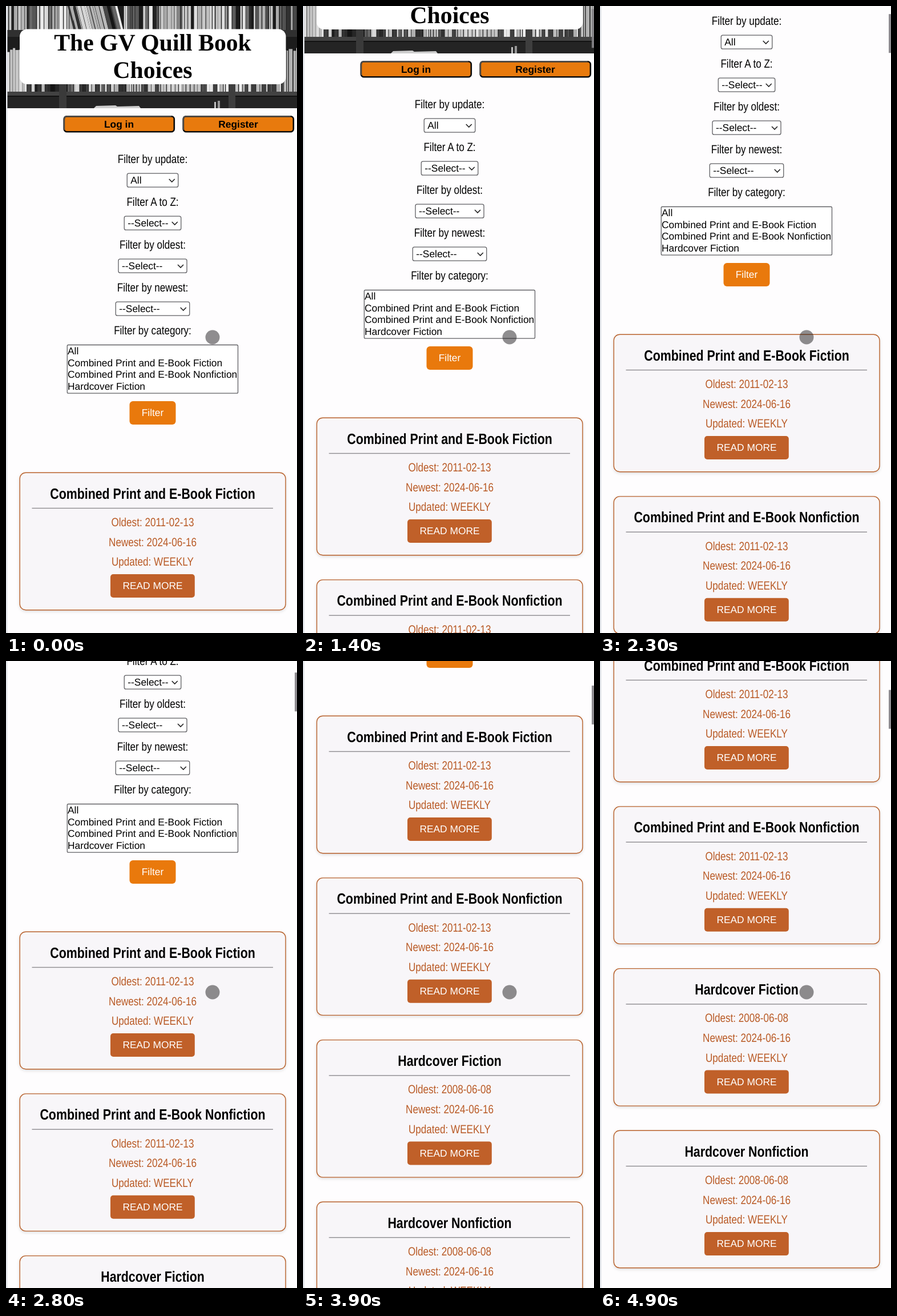
Animation, 510 px wide and 1098 px high, one loop 5000 ms. Source, as an HTML page:

```html
<!DOCTYPE html>
<html lang="en">
<head>
<meta charset="utf-8">
<title>Book lists</title>
<style>
  html, body { margin: 0; width: 100%; height: 100%; overflow: hidden; background: #fefdfe; }
  svg { display: block; text-rendering: geometricPrecision; font-family: "Liberation Sans", Arial, sans-serif; }
  .title { font-family: "Liberation Serif", Times, serif; font-weight: bold; font-size: 41.7px; }
  .ui { font-size: 17.37px; }
  .label { font-size: 20.84px; }
  .head { font-size: 26.05px; font-weight: bold; }
  .bold { font-weight: bold; }
  .mid { text-anchor: middle; }
  .box { fill: #fff; stroke: #5f5f63; stroke-width: 1.3; }
  .card { fill: #f8f6f9; stroke: #b9622c; stroke-width: 1.4; filter: drop-shadow(0 2px 2.5px rgba(0,0,0,.13)); }
</style>
</head>
<body>
<svg width="510" height="1098" viewBox="0 0 510 1098">
  <defs><clipPath id="banner"><rect x="2" width="508" height="179"/></clipPath></defs>
  <g id="page"></g>
  <rect width="2.5" height="1098" fill="#e3e6eb"/>
  <rect id="thumb" x="506" width="4" height="68" fill="#858387" opacity=".92"/>
  <circle cx="362" cy="580" r="12.5" fill="#201e20" opacity=".5"/>
</svg>
<script>
const MID = 257, NARROW = 0.82;

const rect = (x, y, w, h, attrs) => `<rect x="${x}" y="${y}" width="${w}" height="${h}" ${attrs}/>`;
const text = (x, y, str, cls, fill = '#000') => `<text x="${x}" y="${y}" class="${cls}" fill="${fill}">${str}</text>`;
// Condensed face: one fixed ratio for every label
const narrow = (y, str, cls, fill = '#000') =>
  `<g transform="translate(${MID} ${y}) scale(${NARROW} 1)">${text(0, 0, str, cls + ' mid', fill)}</g>`;

let seed = 11;
const rand = () => (seed = (seed * 16807) % 2147483647) / 2147483647;
const grey = v => `fill="rgb(${v},${v},${v})"`;

function books(x0, x1, top, bottom, light) {
  let out = '';
  for (let x = x0; x < x1;) {
    const w = 2 + rand() * 5;
    const v = Math.round(rand() < light ? 165 + rand() * 75 : 20 + rand() * 90);
    const y = top + rand() * 9;
    const lean = x > 112 && x < 205 && top < 0 ? ` transform="rotate(-14 ${x} ${bottom})"` : '';
    out += rect(x.toFixed(1), y.toFixed(1), w.toFixed(1), (bottom - y).toFixed(1), grey(v) + lean);
    x += w + rand() * 1.6;
  }
  return out;
}

function banner() {
  return `<g clip-path="url(#banner)">` +
    rect(2, 0, 508, 179, grey(28)) +
    books(2, 510, -14, 44, 0.58) +
    rect(2, 42, 508, 12, grey(48)) +
    books(2, 92, 72, 151, 0.6) +
    books(108, 388, 72, 151, 0.68) +
    books(402, 510, 72, 151, 0.55) +
    rect(2, 150, 508, 7, grey(66)) + rect(2, 157, 508, 2, grey(18)) +
    rect(2, 159, 508, 20, grey(36)) +
    rect(93, 137, 13, 42, grey(58)) + rect(390, 137, 12, 42, grey(62)) +
    `<path d="M154 179l4-4 34-1 3 2 38-1 3 4z" ${grey(205)}/>` +
    rect(365, 168, 3, 11, grey(190)) + rect(371, 166, 4, 13, grey(150)) +
    `</g>` +
    rect(24, 40.5, 466.5, 96.5, 'rx="13" fill="#fff"') +
    text(MID, 78, 'The GV Quill Book', 'title mid') +
    text(MID, 126, 'Choices', 'title mid');
}

function accountButton(x, label) {
  return rect(x + 1.3, 193.3, 193, 27, 'rx="5" fill="#e87a0d" stroke="#0b0b0b" stroke-width="2.6"') +
    `<path d="M${x + 1.3} 217V198.300q0-5 5-5h183" fill="none" stroke="#4c4a48" stroke-width="2.6"/>` +
    text(x + 97.5, 212.7, label, 'ui bold mid');
}

function select(y, label, value, width) {
  const x = MID - width / 2, right = x + width;
  return narrow(y, label, 'label') +
    rect(x, y + 18.2, width, 24, 'rx="3" class="box"') +
    text(x + 6, y + 36.2, value, 'ui') +
    `<path d="M${right - 16} ${y + 28}l5 5 5-5" fill="none" stroke="#222" stroke-width="1.6"/>`;
}

function card(y, name, oldest) {
  const rows = ['Oldest: ' + oldest, 'Newest: 2024-06-16', 'Updated: WEEKLY'];
  return rect(24.2, y, 465.8, 240.5, 'rx="10.5" class="card"') +
    narrow(y + 45.3, name, 'head') +
    rect(45.5, y + 61.6, 422.5, 1.4, 'fill="#8d8b8f"') +
    rows.map((row, i) => narrow(y + 93.7 + i * 34.6, row, 'label', '#b95a25')).join('') +
    rect(183, y + 177.800, 147.800, 41, 'rx="5" fill="#c06029"') +
    text(MID, y + 204, 'READ MORE', 'ui mid', '#fff');
}

const combined = 'Combined Print and E-Book ';
const selects = [
  ['Filter by update:', 'All', 89.5],
  ['Filter A to Z:', '--Select--', 99.5],
  ['Filter by oldest:', '--Select--', 120],
  ['Filter by newest:', '--Select--', 129.5]
];
const options = ['All', combined + 'Fiction', combined + 'Nonfiction', 'Hardcover Fiction'];
const cards = [
  [combined + 'Fiction', '2011-02-13'],
  [combined + 'Nonfiction', '2011-02-13'],
  ['Hardcover Fiction', '2008-06-08'],
  ['Hardcover Nonfiction', '2008-06-08']
];

const page = document.getElementById('page');
const thumb = document.getElementById('thumb');
page.innerHTML = banner() +
  accountButton(100.5, 'Log in') + accountButton(309.5, 'Register') +
  selects.map((s, i) => select(275 + i * 75, ...s)).join('') +
  narrow(575, 'Filter by category:', 'label') +
  rect(107.3, 593.5, 299.2, 84.700, 'rx="2" class="box"') +
  options.map((o, i) => text(108, 609.8 + i * 20.84, o, 'ui')).join('') +
  rect(216.5, 692, 81, 41, 'rx="6" fill="#e9790c"') +
  text(MID, 718, 'Filter', 'ui mid', '#fff') +
  cards.map((c, i) => card(817.2 + i * 283.7, ...c)).join('');

// Scroll path: time, offset, speed
const path = [
  [600, 0, 0], [1000, 38, 0.14], [1800, 158, 0.165],
  [2800, 343, 0.23], [3500, 544, 0.36], [3900, 721, 0.417]
];

function scrollAt(t) {
  if (t <= 600) return 0;
  if (t >= 3900) return 846 - 125 * (1 - Math.min(1, (t - 3900) / 900)) ** 3;
  const i = path.findIndex(k => k[0] > t);
  const [t0, y0, v0] = path[i - 1], [t1, y1, v1] = path[i];
  const d = t1 - t0, p = (t - t0) / d, q = 1 - p;
  return y0 * q * q * (1 + 2 * p) + y1 * p * p * (3 - 2 * p) + d * p * q * (v0 * q - v1 * p);
}

const start = performance.now();
function draw() {
  const t = Math.floor((performance.now() - start) % 5000 / 100) * 100;
  const y = Math.round(scrollAt(t));
  page.setAttribute('transform', `translate(0 ${-y})`);
  thumb.setAttribute('y', y * 0.0605 - 0.5);
  thumb.setAttribute('visibility', y > 0 ? 'visible' : 'hidden');
  requestAnimationFrame(draw);
}
draw();
</script>
</body>
</html>
```
